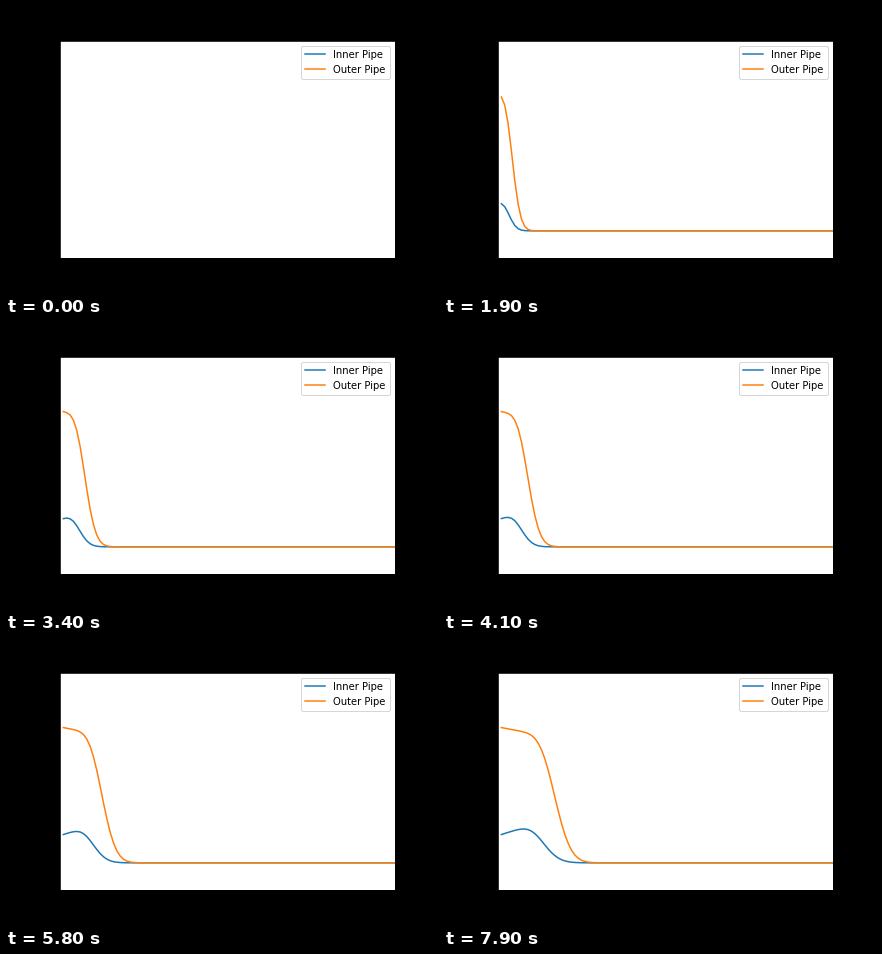
Write a matplotlib script that moves like this. It is 432 px wide and 288 px high and loops after 8000 ms.

```python
import numpy as np
import matplotlib.pyplot as plt
from matplotlib.animation import FuncAnimation

FRAMES, INTERVAL = 80, 100

# Geometry and fluids (SI units)
L, N = 60.0, 100
R_IN, R_OUT = 0.1, 0.15
FLOW_IN, FLOW_OUT = 3.0, 5.0
CP, RHO, U = 4180.0, 1000.0, 340.0
T_START, T_IN, T_OUT = 300.0, 400.0, 800.0
DT = 1.0

dx = L / N
x = np.linspace(dx, L, N)
area_in = np.pi * R_IN**2
area_out = np.pi * (R_OUT**2 - R_IN**2)


def rate(temp, inlet, other, flow, area):
    """Upwind advection plus heat exchanged through the pipe wall."""
    upstream = np.concatenate(([inlet], temp[:-1]))
    carried = flow * CP * (upstream - temp)
    exchanged = U * 2 * np.pi * R_IN * dx * (other - temp)
    return (carried + exchanged) / (RHO * CP * dx * area)


def simulate(steps):
    t1 = np.full(N, T_START)
    t2 = np.full(N, T_START)
    states = [(t1, t2)]
    for _ in range(steps - 1):
        d1 = rate(t1, T_IN, t2, FLOW_IN, area_in)
        d2 = rate(t2, T_OUT, t1, FLOW_OUT, area_out)
        t1, t2 = t1 + d1 * DT, t2 + d2 * DT
        states.append((t1, t2))
    return states


states = simulate(FRAMES)

fig, ax = plt.subplots(figsize=(6, 4), dpi=72, facecolor="black")
fig.subplots_adjust(left=0.125, right=0.9, bottom=0.125, top=0.88)
ax.set(xlim=(0, L), ylim=(200, 1000), xticks=[], yticks=[])
inner, = ax.plot([], [], color="tab:blue", lw=1.5, label="Inner Pipe")
outer, = ax.plot([], [], color="tab:orange", lw=1.5, label="Outer Pipe")
ax.legend(loc="upper right")


def update(i):
    # The plot starts out empty.
    for line, temp in zip((inner, outer), states[i]):
        if i == 0:
            line.set_data([], [])
        else:
            line.set_data(x, temp)
    return inner, outer


anim = FuncAnimation(fig, update, frames=FRAMES, interval=INTERVAL,
                     init_func=lambda: update(0), repeat=True, repeat_delay=0)
plt.show()
```
